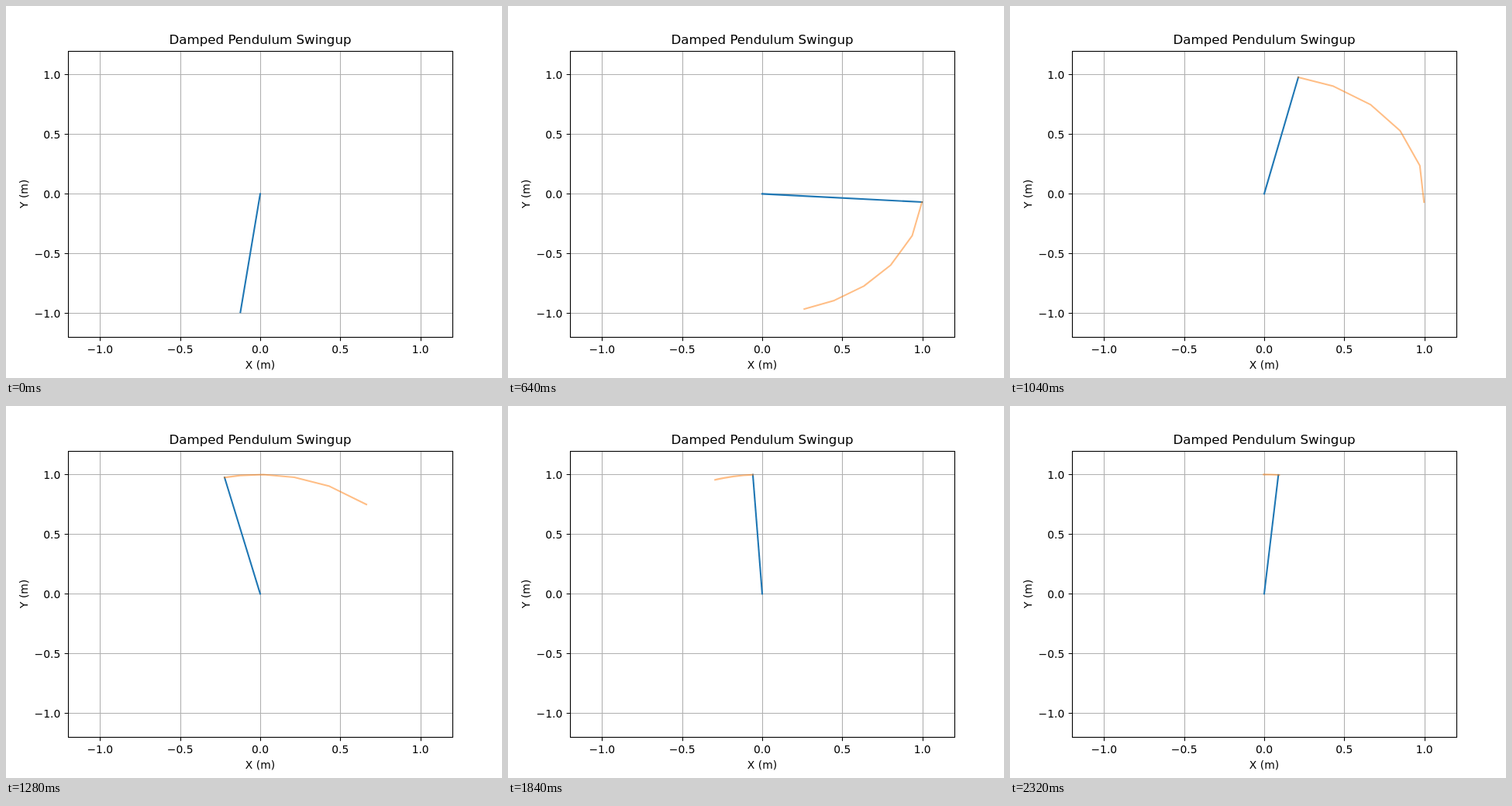
An HTML page for the animation above (2400 ms loop, 640 px wide and 480 px high).

```html
<!DOCTYPE html>
<html lang="en">
<head>
<meta charset="utf-8">
<title>Damped Pendulum Swingup</title>
<style>
  html, body { margin: 0; width: 100%; height: 100%; overflow: hidden; background: #fff; }
  svg { display: block; width: 100%; height: 100%; }
  text { font: 13.889px "DejaVu Sans", Verdana, sans-serif; fill: #000; text-anchor: middle; }
  .title { font-size: 16.667px; }
  .right { text-anchor: end; }
  .grid, .axis { fill: none; stroke-width: 1.11; }
  .grid { stroke: #b0b0b0; }
  .axis { stroke: #000; }
  .rod, .trail { fill: none; stroke-width: 2.083; stroke-linecap: square; stroke-linejoin: round; }
  .rod { stroke: #1f77b4; }
  .trail { stroke: #ff7f0e; stroke-opacity: .5; }
</style>
</head>
<body>
<svg viewBox="0 0 640 480">
  <g id="back"></g>
  <polyline id="rod" class="rod"/>
  <polyline id="trail" class="trail"/>
  <rect class="axis" x="80.5" y="58.5" width="496" height="369"/>
  <text class="title" x="328" y="49">Damped Pendulum Swingup</text>
  <text x="328" y="468">X (m)</text>
  <text transform="translate(28 242.4) rotate(-90)">Y (m)</text>
</svg>
<script>
const STEP = 80, TRAIL = 5;

// Pendulum angle in radians at each step, zero hanging straight down.
const angles = [
  -.124, -.030, .100, .266, .467, .688, .932, 1.212, 1.502, 1.809,
  2.128, 2.417, 2.694, 2.927, 3.122, 3.267, 3.366, 3.422, 3.440, 3.427,
  3.383, 3.322, 3.260, 3.200, 3.145, 3.099, 3.068, 3.052, 3.047, 3.053
];

const $ = id => document.getElementById(id);
const px = x => 328 + x * 620 / 3;
const py = y => 242.4 - y * 154;
const snap = v => Math.round(v) + .5;
const point = (x, y) => px(x).toFixed(2) + "," + py(y).toFixed(2);
const tips = angles.map(a => point(Math.sin(a), -Math.cos(a)));

function add(tag, attrs, label = "") {
  const el = document.createElementNS("http://www.w3.org/2000/svg", tag);
  for (const name in attrs) el.setAttribute(name, attrs[name]);
  el.textContent = label;
  $("back").append(el);
}

for (const v of [-1, -.5, 0, .5, 1]) {
  const x = snap(px(v)), y = snap(py(v));
  const label = v.toFixed(1).replace("-", "\u2212");
  add("path", { class: "grid", d: `M${x} 58V428M80 ${y}H577` });
  add("path", { class: "axis", d: `M${x} 427.5v4.86M80.5 ${y}h-4.86` });
  add("text", { x: px(v), y: 448 }, label);
  add("text", { class: "right", x: 70.28, y: y + 5.5 }, label);
}

let shown = -1;
function draw(time) {
  const k = Math.floor(time / STEP) % tips.length;
  if (k === shown) return;
  shown = k;
  $("rod").setAttribute("points", point(0, 0) + " " + tips[k]);
  const trail = tips.slice(Math.max(0, k - TRAIL), k + 1);
  $("trail").setAttribute("points", k ? trail.join(" ") : "");
}

function tick(now) {
  draw(now);
  requestAnimationFrame(tick);
}
draw(0);
requestAnimationFrame(tick);
</script>
</body>
</html>
```
